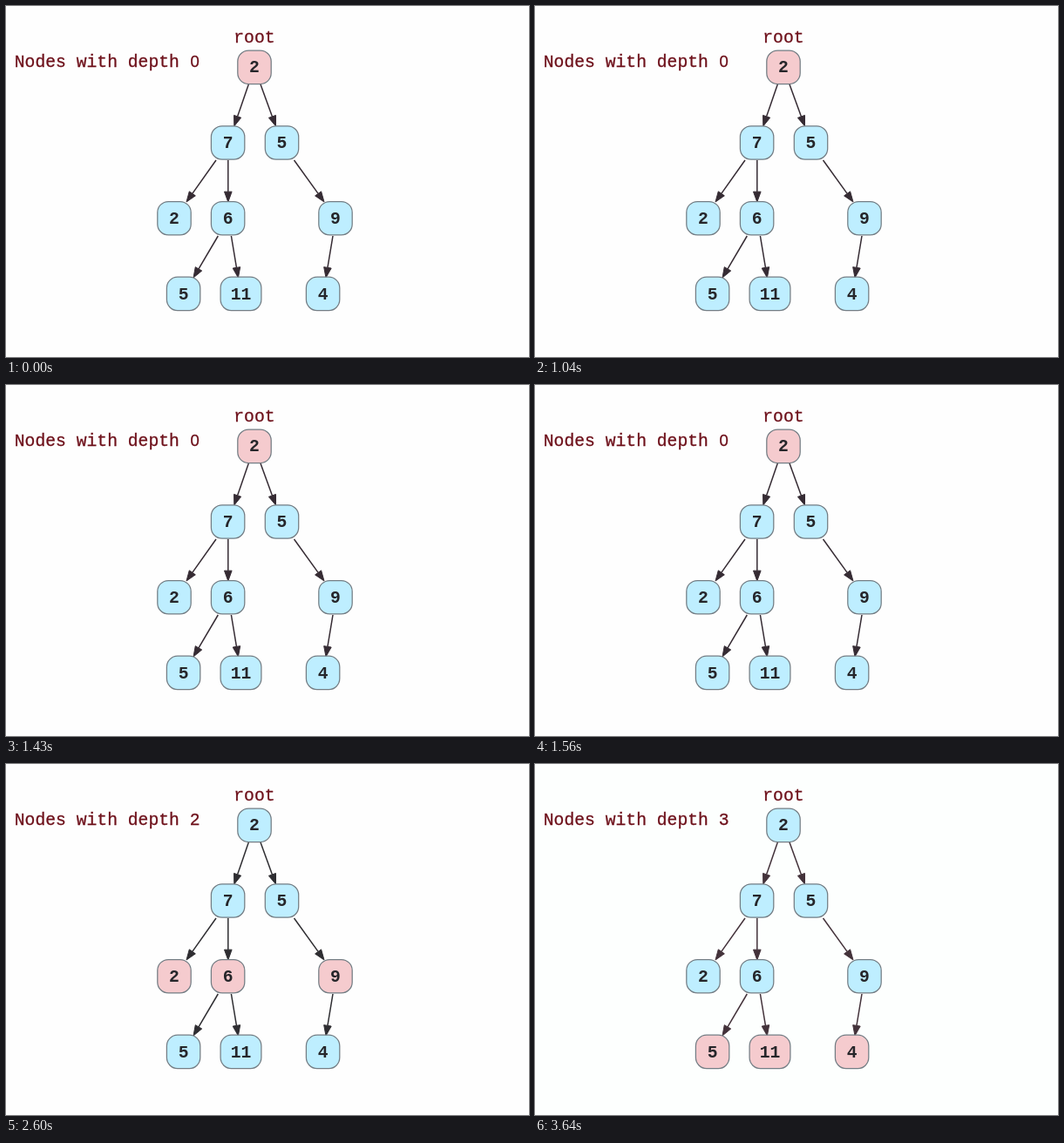
Recreate the animation shown at these times as an HTML page with a canvas. Size 600 px wide and 403 px high, loop 3770 ms.

```html
<!DOCTYPE html>
<html lang="en">
<head>
<meta charset="utf-8">
<title>Nodes by depth</title>
<style>
  html, body { margin: 0; width: 100%; height: 100%; overflow: hidden; background: #fefefe; }
  canvas { display: block; width: 600px; height: 403px; }
</style>
</head>
<body>
<canvas id="stage"></canvas>
<script>
const W = 600, H = 403, LOOP = 3770;
const STARTS = [0, 1690, 2600, 3640];
const INKS = ['#352b33', '#2c2e33', '#2e2d31', '#43323a'];
const MARKED = '#f5cbce', PLAIN = '#beeeff';
const LABEL = '#6e111b';
const MONO = '19.7px "Liberation Mono", monospace';
const SANS = '18.5px "Liberation Sans", sans-serif';

// [label, depth, centre x, centre y, width]
const nodes = [
  ['2', 0, 285, 70.3, 38.4],
  ['7', 1, 254.6, 157, 38.4],
  ['5', 1, 316.5, 157, 38.4],
  ['2', 2, 193, 243.7, 38.4],
  ['6', 2, 254.6, 243.7, 38.4],
  ['9', 2, 378, 243.7, 38.4],
  ['5', 3, 203.6, 330.4, 38.4],
  ['11', 3, 269.5, 330.4, 46.8],
  ['4', 3, 363.6, 330.4, 38.4]
];

// [start x, start y, tip x, tip y]
const edges = [
  [278.3, 90, 261.8, 138],
  [292, 90, 309.5, 138],
  [241, 177, 207, 225],
  [254.8, 177, 254.8, 225],
  [330.5, 177, 365, 225],
  [243.3, 264, 215, 312],
  [258.4, 264, 266.4, 312],
  [375, 264, 367, 312]
];

const canvas = document.getElementById('stage');
const ctx = canvas.getContext('2d');
const scale = window.devicePixelRatio || 1;
canvas.width = W * scale;
canvas.height = H * scale;
ctx.scale(scale, scale);

function write(text, x, y, font, color, align, weight = 0) {
  ctx.font = font;
  ctx.fillStyle = ctx.strokeStyle = color;
  ctx.textAlign = align;
  ctx.fillText(text, x, y);
  if (weight) {
    ctx.lineWidth = weight;
    ctx.strokeText(text, x, y);
  }
}

function drawEdge([x1, y1, x2, y2], ink) {
  const size = 11.8, half = 4.3;
  const len = Math.hypot(x2 - x1, y2 - y1);
  const ux = (x2 - x1) / len, uy = (y2 - y1) / len;
  const bx = x2 - ux * size, by = y2 - uy * size;
  ctx.strokeStyle = ctx.fillStyle = ink;
  ctx.lineWidth = 1.5;
  ctx.beginPath();
  ctx.moveTo(x1, y1);
  ctx.lineTo(bx, by);
  ctx.stroke();
  ctx.lineWidth = 1;
  ctx.beginPath();
  ctx.moveTo(x2, y2);
  ctx.lineTo(bx - uy * half, by + ux * half);
  ctx.lineTo(bx + uy * half, by - ux * half);
  ctx.closePath();
  ctx.fill();
  ctx.stroke();
}

function drawNode([label, level, x, y, w], depth) {
  const h = 38.4;
  ctx.beginPath();
  ctx.roundRect(x - w / 2, y - h / 2, w, h, 12.5);
  ctx.fillStyle = level === depth ? MARKED : PLAIN;
  ctx.fill();
  ctx.strokeStyle = '#737d84';
  ctx.lineWidth = 1.25;
  ctx.stroke();
  write(label, x, y + 6.1, 'bold 19.7px "Liberation Mono", monospace', '#26262a', 'center');
}

function drawTitle(depth) {
  const lead = 'Nodes with depth ', left = 9.8;
  const y = depth === 0 ? 70.3 : 69.6;
  write('root', 284.9, 41.7, MONO, LABEL, 'center', 0.3);
  write(lead, left, y, MONO, LABEL, 'left', 0.3);
  const x = left + ctx.measureText(lead).width + ctx.measureText('0').width / 2;
  // The mono face dots its zero, so a plain one is used there
  write(String(depth), x, y, depth === 0 ? SANS : MONO, LABEL, 'center', 0.3);
}

function draw(time) {
  const depth = STARTS.filter(start => start <= time).length - 1;
  ctx.fillStyle = depth === 3 ? '#fdfffe' : '#fefefe';
  ctx.fillRect(0, 0, W, H);
  edges.forEach(edge => drawEdge(edge, INKS[depth]));
  nodes.forEach(node => drawNode(node, depth));
  drawTitle(depth);
}

const begin = performance.now();
function tick() {
  draw((performance.now() - begin) % LOOP);
  requestAnimationFrame(tick);
}
tick();
</script>
</body>
</html>
```
